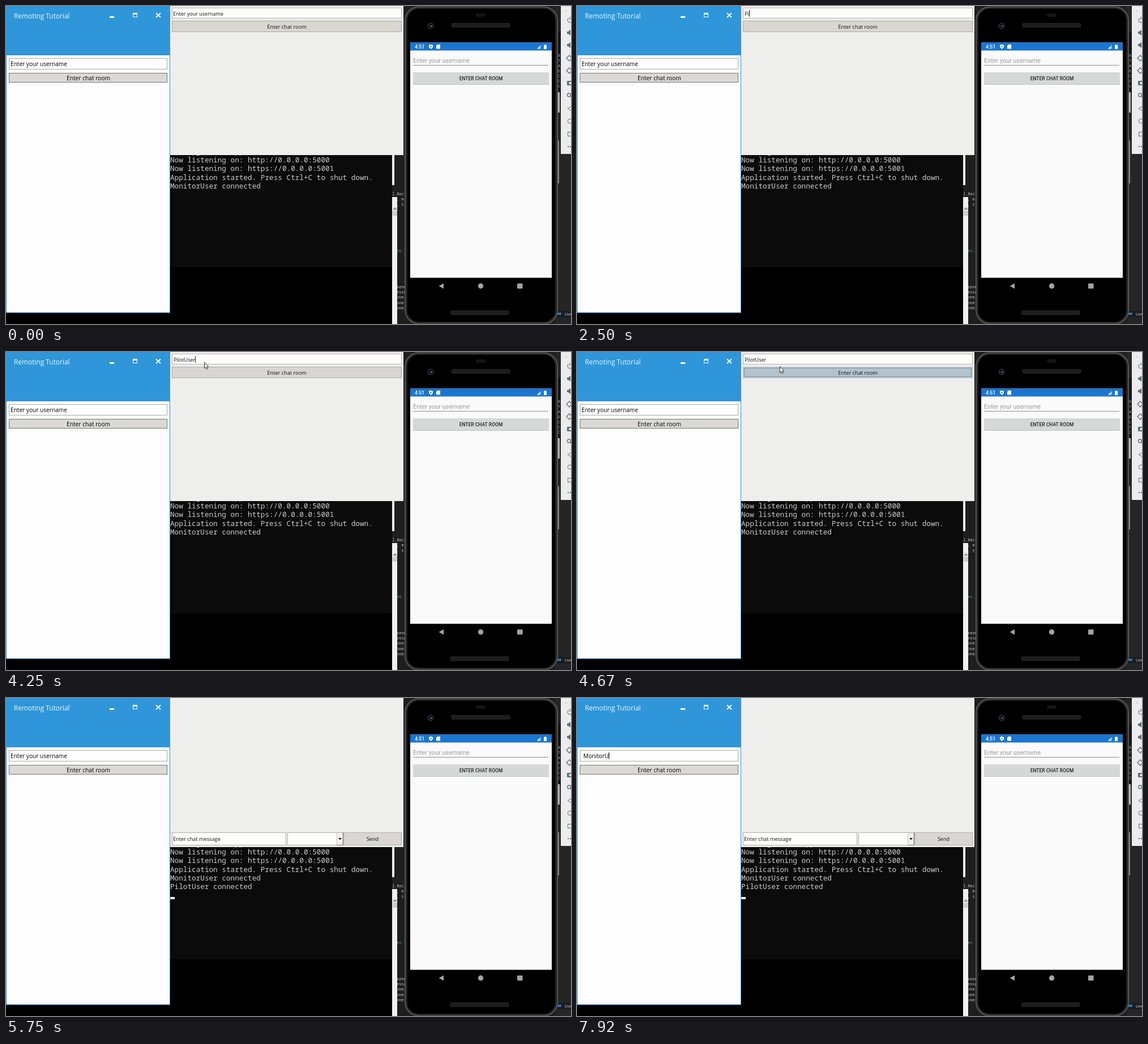
Write an HTML page with a canvas that moves like this. It is 998 px wide and 561 px high and loops after 8 s.

```html
<!DOCTYPE html>
<html lang="en">
<head>
<meta charset="utf-8">
<title>Remoting Tutorial</title>
<style>
html, body { margin: 0; width: 100%; height: 100%; overflow: hidden; background: #000; }
canvas { display: block; }
</style>
</head>
<body>
<canvas id="stage" width="998" height="561"></canvas>
<script>
const ctx = document.getElementById('stage').getContext('2d');
const LOOP = 8000;
const UI = '"Open Sans", "Noto Sans", sans-serif';
const PHONE = 'Roboto, sans-serif';
const MONO = '"Noto Sans Mono", "DejaVu Sans Mono", monospace';
const DESKTOP_NAME = 'MonitorUser';
const GUEST_NAME = 'PilotUser';

// Key press times in ms
const guestKeys = [2330, 2500, 2670, 2830, 2920, 3170, 3420, 3580, 3750];
const desktopKeys = [6750, 7000, 7170, 7330, 7500, 7580, 7750, 7830];

function rect(x, y, w, h, fill) {
  ctx.fillStyle = fill;
  ctx.fillRect(x, y, w, h);
}

function box(x, y, w, h, fill, stroke) {
  rect(x, y, w, h, fill);
  ctx.strokeStyle = stroke;
  ctx.lineWidth = 1;
  ctx.strokeRect(x + 0.5, y + 0.5, w - 1, h - 1);
}

function rounded(x, y, w, h, r, fill, stroke, width = 1) {
  ctx.beginPath();
  ctx.roundRect(x, y, w, h, r);
  if (fill) { ctx.fillStyle = fill; ctx.fill(); }
  if (stroke) { ctx.strokeStyle = stroke; ctx.lineWidth = width; ctx.stroke(); }
}

function disc(x, y, r, fill) {
  ctx.beginPath();
  ctx.arc(x, y, r, 0, Math.PI * 2);
  ctx.fillStyle = fill;
  ctx.fill();
}

function poly(points, fill, stroke, width = 1) {
  ctx.beginPath();
  points.forEach(([x, y]) => ctx.lineTo(x, y));
  ctx.closePath();
  if (fill) { ctx.fillStyle = fill; ctx.fill(); }
  if (stroke) { ctx.strokeStyle = stroke; ctx.lineWidth = width; ctx.stroke(); }
}

function text(str, x, y, size, color, family = UI, align = 'left', weight = 400) {
  ctx.font = `${weight} ${size}px ${family}`;
  ctx.fillStyle = color;
  ctx.textAlign = align;
  ctx.fillText(str, x, y);
  return ctx.measureText(str).width;
}

const typed = (name, keys, t) => name.slice(0, keys.filter(k => k <= t).length);
const between = (t, a, b) => t >= a && t < b;

function drawEditor() {
  rect(0, 0, 998, 561, '#000');
  rect(682, 0, 316, 561, '#1e1e1e');
  rect(682, 263, 4, 53, '#f2f2f2');
  rect(686, 263, 18, 74, '#1e1e1e');
  text('l.Rect', 682, 334, 7, '#c4c4c4', MONO);
  rect(682, 337, 9, 224, '#f0f0f0');
  rect(683, 361, 8, 9, '#cdcdcd');
  poly([[684.5, 358.5], [687, 355.5], [689.5, 358.5]], null, '#555');
  text(', m', 690, 343, 7, '#bdbdbd', MONO);
  text(', t', 690, 353, 7, '#bdbdbd', MONO);
  text('ec..', 691, 434, 7, '#49a68c', MONO);
  ['send', 'essa', 'one', 'one', 'one'].forEach((word, i) =>
    text(word, 690, 498 + i * 9.2, 7, '#c8c8c8', MONO));
  rect(970, 0, 28, 561, '#252526');
  rect(974, 45, 6, 110, '#151619');
  ['Re', 'T', 'A', 'E', 'C', 'C', 'C'].forEach((word, i) =>
    text(word, 975, 90 + i * 9, 7, '#a8a8a8', MONO));
  rect(975, 152, 3, 36, '#b9b9b5');
  rect(974, 237, 3, 76, '#85858a');
  rect(974, 538, 24, 11, '#1b1c20');
  rect(974, 541, 7, 4, '#2676b8');
  text('Live', 987, 546, 7, '#dedede');
}

function drawToolbar() {
  const ink = '#54727b';
  rect(980, 0, 18, 261, '#ececec');
  text('–', 987, 10, 7, '#777');
  ctx.strokeStyle = ink;
  ctx.lineWidth = 1.2;
  ctx.beginPath();
  ctx.arc(996, 25, 4, -0.9, Math.PI + 0.9);
  ctx.moveTo(996, 19);
  ctx.lineTo(996, 24);
  ctx.stroke();
  for (const y of [47, 69]) {
    poly([[991, y - 2], [993, y - 2], [997, y - 5], [997, y + 5], [993, y + 2], [991, y + 2]], ink);
  }
  for (const y of [92, 114]) {
    poly([[990, y], [995, y - 5], [1000, y], [995, y + 5]], null, ink, 1.3);
  }
  rounded(991, 132, 12, 8, 1, ink);
  disc(996.5, 136, 2.2, '#ececec');
  ctx.beginPath();
  ctx.arc(994.5, 157, 3, 0, 7);
  ctx.moveTo(997, 159);
  ctx.lineTo(999, 162);
  ctx.strokeStyle = ink;
  ctx.stroke();
  poly([[992, 181], [999, 177], [999, 185]], null, ink);
  ctx.beginPath();
  ctx.arc(996, 203, 3.8, 0, 7);
  ctx.stroke();
  ctx.strokeRect(992.5, 222.5, 7, 7);
  rect(992, 247, 2, 2, ink);
  rect(996, 247, 2, 2, ink);
}

function drawPhone() {
  rounded(705, 1.5, 269, 559, 24, '#1c1c1c', '#565653', 2);
  rounded(708, 4, 263, 554, 21, '#000', '#2c2c2c', 1.5);
  rounded(830, 13, 17, 6, 3, '#151518');
  rounded(787, 30.5, 103, 7, 2, '#1d1d1e', '#262628');
  rounded(785, 537.5, 103, 7, 2, '#1d1d1e', '#262628');
  disc(750, 35, 5.8, '#26272c');
  disc(750, 35, 3.7, '#101118');
  disc(751, 35.5, 1.3, '#7880a0');

  rect(714, 64.5, 250, 415, '#fafafa');
  rect(714, 64.5, 250, 14, '#1976d2');
  text('4:51', 722, 75, 8.8, '#fff', PHONE, 'left', 500);
  poly([[747, 69], [750, 68], [754, 69], [754, 72.5], [750.5, 76], [747, 72.5]], '#fff');
  disc(750.5, 71.8, 1.2, '#1976d2');
  poly([[760, 70], [762, 68], [767, 68], [767, 75.5], [760, 75.5]], '#fff');
  poly([[938, 75.5], [945, 68.5], [945, 75.5]], '#8fc0ee');
  poly([[938, 75.5], [942, 71.5], [942, 75.5]], '#fff');
  rect(950, 69, 5, 7, '#fff');
  rect(951.5, 68, 2, 1, '#fff');

  text('Enter your username', 719, 100, 10.9, '#9b9b9b', PHONE);
  rect(719, 104, 239, 1, '#8d8d8d');
  rounded(719, 117, 240, 21.5, 1, '#d6d7d7');
  rect(719, 138, 240, 1, '#c2c3c3');
  text('ENTER CHAT ROOM', 839, 131, 8.5, '#222', PHONE, 'center', 500);

  poly([[764.5, 494], [773, 489.3], [773, 498.7]], '#a4a4a4');
  disc(838.5, 494, 4.7, '#a4a4a4');
  rounded(903, 489.5, 9.5, 9, 1, '#a4a4a4');
}

function drawConsole(t) {
  const connected = t >= 5750;
  const line = (str, y) => text(str, 290, y, 12.7, '#cccccc', MONO);
  rect(290, 263, 392, 198, '#0b0b0b');
  ctx.save();
  ctx.beginPath();
  ctx.rect(290, 263, 392, 298);
  ctx.clip();
  line('Hosting local apps', 260.5);
  line('Now listening on: http://0.0.0.0:5000', 276);
  line('Now listening on: https://0.0.0.0:5001', 291);
  line('Application started. Press Ctrl+C to shut down.', 306.5);
  line(DESKTOP_NAME + ' connected', 321.5);
  if (connected) line(GUEST_NAME + ' connected', 337);
  ctx.restore();
  const cursorOn = t >= 750 && (t - 750) % 1000 < 500;
  if (cursorOn) rect(290, connected ? 351 : 336, 8, 4, '#f2f2f2');
}

function drawLogin(t) {
  const hover = t >= 4330;
  const pressed = between(t, 4920, 5080);
  box(293, 3, 406, 19, '#fdfdfc', '#b4b2ae');
  if (t < 250) {
    text('Enter your username', 295, 16.5, 9, '#111');
  } else {
    const name = typed(GUEST_NAME, guestKeys, t);
    const width = text(name, 296, 16.5, 9, '#111');
    const caretOn = t < 2080 ? between(t, 250, 580) || between(t, 1080, 1580) : t < 4330;
    if (caretOn) rect(Math.round(296 + width), 7, 1, 12, '#111');
  }
  if (hover) {
    box(293, 26, 406, 20, pressed ? '#a5b6c3' : '#bac7d2', '#b9bdc6');
    box(295, 28, 402, 16, pressed ? '#9fb1bf' : '#b2c3ce', '#7f97ab');
  } else {
    box(293, 26, 406, 20, '#d9d6d2', '#aaa8a6');
  }
  text('Enter chat room', 496, 39.5, 9.25, '#111', UI, 'center');
}

function drawChat(t) {
  box(293, 237, 202, 23, '#fdfdfc', '#b0aeab');
  text('Enter chat message', 295, 251.5, 9.2, '#111');
  box(497, 237, 99, 23, '#fdfdfc', '#b0aeab');
  if (t < 5750) text('All', 499, 251.2, 8.2, '#111');
  rect(585, 238, 10, 21, '#f0efed');
  rect(584, 238, 1, 21, '#c5c3c0');
  rect(595, 237, 1, 23, '#4c4c4c');
  rect(585, 259, 11, 1, '#6c6c6c');
  poly([[587, 247], [593, 247], [590, 250.3]], '#111');
  box(597, 237, 102, 23, '#d9d6d3', '#b4b1ae');
  text('Send', 647.5, 251.5, 9.1, '#111', UI, 'center');
}

function drawPointer(t) {
  if (!between(t, 4080, 5250)) return;
  const p = Math.min(1, (t - 4080) / 500);
  const ease = 1 - (1 - p) * (1 - p);
  const x = 340 + 18.5 * ease;
  const y = 8 + 17.5 * ease;
  const shape = [[0, 0], [0, 11], [2.4, 8.8], [4, 12.3], [5.6, 11.5], [4.1, 8.2], [7.3, 8]];
  poly(shape.map(([a, b]) => [x + a, y + b]), '#fff', '#222', 0.9);
}

function drawDesktop(t) {
  const blue = '#2f96d9';
  rect(0, 0, 290, 541.5, blue);
  rect(1, 87, 288, 453.5, '#fdfdfd');
  text('Remoting Tutorial', 14, 21.5, 11.9, '#eaf5fc');
  rect(183, 18, 8, 3, '#fff');
  rect(224, 12, 8, 8, '#fff');
  rect(225, 15, 6, 4, blue);
  ctx.beginPath();
  ctx.moveTo(265, 12.5);
  ctx.lineTo(273, 20);
  ctx.moveTo(273, 12.5);
  ctx.lineTo(265, 20);
  ctx.strokeStyle = '#fff';
  ctx.lineWidth = 1.8;
  ctx.stroke();

  box(5, 92, 280, 20, '#fefefe', '#aaa9a4');
  if (t < 6080) {
    text('Enter your username', 8, 106, 10.15, '#000');
  } else {
    const width = text(typed(DESKTOP_NAME, desktopKeys, t), 11, 106, 10.15, '#000');
    if (!between(t, 6580, 6750)) rect(Math.round(11 + width), 96, 1, 12, '#000');
  }
  box(5, 118, 280, 17, '#dad9d5', '#747474');
  text('Enter chat room', 145.5, 130.5, 10.2, '#000', UI, 'center');
}

function draw(t) {
  drawEditor();
  drawPhone();
  drawToolbar();
  drawConsole(t);
  rect(290, 0, 412, 263, '#eeeeec');
  if (t < 5250) drawLogin(t); else drawChat(t);
  drawDesktop(t);
  drawPointer(t);
}

function tick() {
  draw(performance.now() % LOOP);
  requestAnimationFrame(tick);
}
tick();
</script>
</body>
</html>
```
